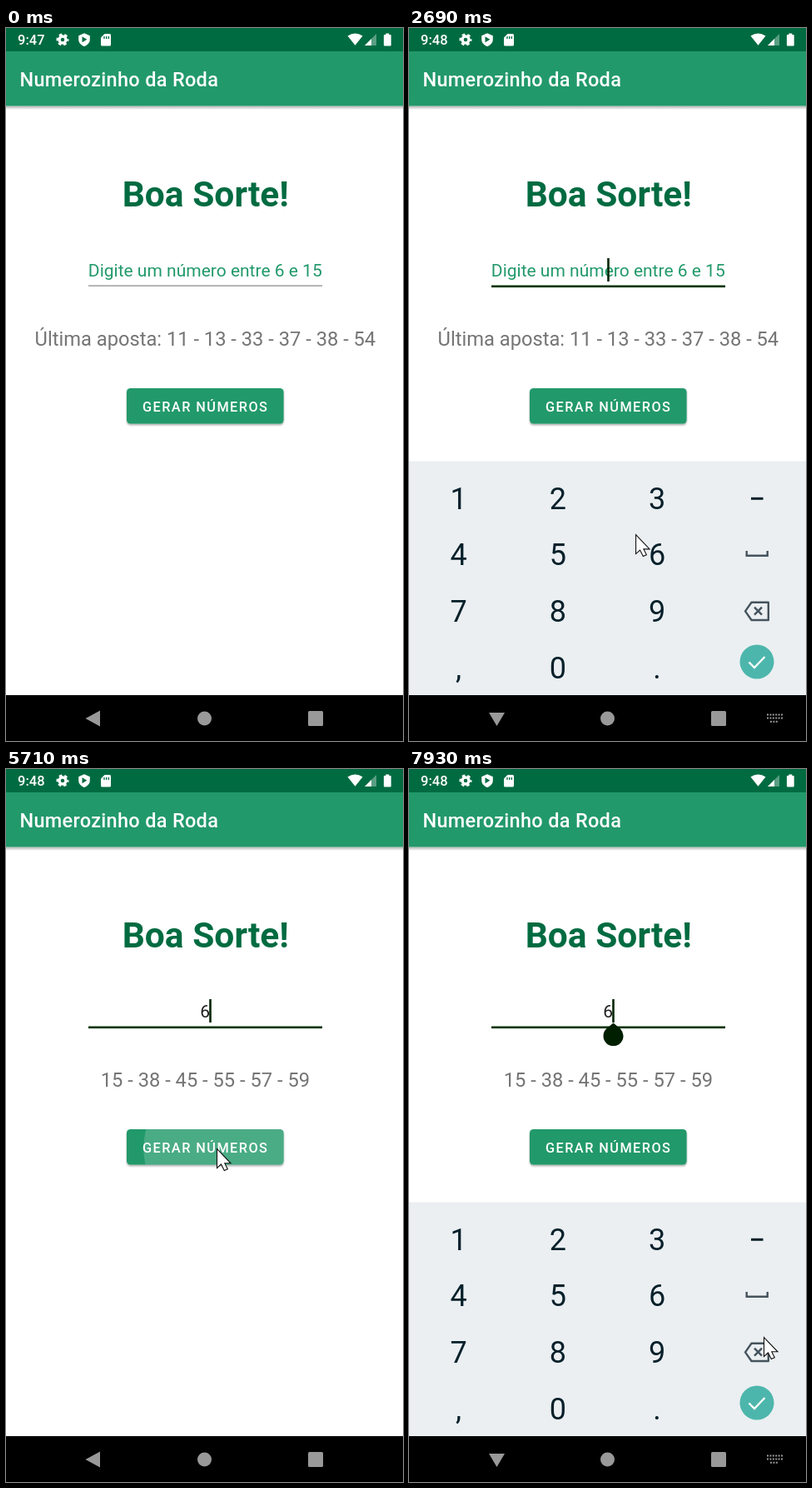
An HTML page that plays this animation: 477x855 px, repeating every 8000 ms.

```html
<!DOCTYPE html>
<html lang="pt-BR">
<head>
<meta charset="utf-8">
<title>Numerozinho da Roda</title>
<style>
  html, body { margin: 0; width: 100%; height: 100%; overflow: hidden; background: #fff; }
  svg { display: block; width: 100vw; height: 100vh; }
  text { font-family: Roboto, "Open Sans", sans-serif; }
  .mid { text-anchor: middle; }
  .medium { font-weight: 500; fill: #fff; }
  #keys text { font-size: 36px; fill: #06202a; text-anchor: middle; }
</style>
</head>
<body>
<svg viewBox="0 0 477 855">
  <defs>
    <linearGradient id="fall" x2="0" y2="1">
      <stop stop-color="#000" stop-opacity=".3"/>
      <stop offset="1" stop-color="#000" stop-opacity="0"/>
    </linearGradient>
    <filter id="lift" x="-10%" y="-20%" width="120%" height="150%">
      <feDropShadow dx="0" dy="1.6" stdDeviation="1.2" flood-opacity=".36"/>
    </filter>
    <clipPath id="btnClip"><rect x="145" y="432" width="188.6" height="42.5" rx="4.6"/></clipPath>
  </defs>
  <rect width="477" height="855" fill="#fff"/>

  <!-- app bar -->
  <rect y="93.5" width="477" height="4.5" fill="url(#fall)"/>
  <rect y="28" width="477" height="65.5" fill="#22996b"/>
  <text class="medium" x="16.5" y="70" font-size="23.5" letter-spacing=".3">Numerozinho da Roda</text>

  <!-- status bar -->
  <rect width="477" height="28" fill="#006b41"/>
  <text id="clock" class="medium" x="14" y="20" font-size="16.5"></text>
  <g fill="#fff">
    <circle cx="68" cy="14" r="4" fill="none" stroke="#fff" stroke-width="3.4"/>
    <circle cx="68" cy="14" r="6.3" fill="none" stroke="#fff" stroke-width="2.4" stroke-dasharray="3.5 3.1" stroke-dashoffset="1.75"/>
    <path d="M94 6.3l6.8 2.9v4.6c0 3.9-2.9 6.9-6.8 8.2c-3.9-1.3-6.8-4.3-6.8-8.2V9.2z"/>
    <path d="M91.5 10.3v7l5.8-3.5z" fill="#006b41"/>
    <path d="M118.5 7h6q1.5 0 1.5 1.5v11.5q0 1.5-1.5 1.5h-9q-1.5 0-1.5-1.5v-8.5z"/>
    <path d="M118 10v3M120.7 10v3M123.4 10v3" stroke="#006b41" stroke-width="1.3"/>
    <path d="M410.5 9.6q9-6 18 0L419.5 20.8z"/>
    <path d="M445 7v14h-14z" opacity=".35"/>
    <path d="M439 13v8h-8z"/>
    <path d="M456.3 6.5h4v1.5h1.4q1 0 1 1v11.5q0 1-1 1h-6.8q-1 0-1-1V9q0-1 1-1h1.4z"/>
  </g>

  <!-- form -->
  <text class="mid" x="239.8" y="214" font-size="42.5" font-weight="700" fill="#006b41">Boa Sorte!</text>
  <text id="hint" class="mid" x="239.3" y="298" font-size="21" fill="#22996b">Digite um número entre 6 e 15</text>
  <text id="value" class="mid" x="239.2" y="298" font-size="21" fill="#212121">6</text>
  <rect id="line" x="99" y="308.5" width="281"/>
  <rect id="caret" y="276" width="2.6" height="28" fill="#002600"/>
  <path id="handle" d="M245.5 304.5l7.8 6.5a12 12 0 1 1-15.6 0z" fill="#001f00"/>
  <text id="bet" class="mid" x="239.4" y="381" font-size="23.7" fill="#757575"></text>
  <rect x="145" y="432" width="188.6" height="42.5" rx="4.6" fill="#22996b" filter="url(#lift)"/>
  <circle id="ripple" cx="253" cy="455" fill="#fff" clip-path="url(#btnClip)"/>
  <text class="medium" x="164" y="460" font-size="16.3" letter-spacing="1.46">GERAR NÚMEROS</text>

  <!-- number pad -->
  <g id="pad">
    <rect y="519.5" width="477" height="281" fill="#ebeff2"/>
    <rect id="press" x="241" y="598" width="117" height="66" fill="#dce1e5"/>
    <g id="keys"></g>
    <g fill="none" stroke="#44535d" stroke-width="2.4">
      <path d="M411 564.3h14.5" stroke="#06202a" stroke-width="3"/>
      <path d="M405.7 627v5.8h25V627"/>
      <path d="M411.5 688.7h20.3v21.3h-20.3l-7.5-10.65z" stroke-linejoin="round"/>
      <path d="M415 694.7l9 9m0-9l-9 9"/>
    </g>
    <circle id="done" cx="418" cy="760" r="20.5"/>
    <path d="M408.5 760.5l6.5 6.5 12.5-13" fill="none" stroke="#fff" stroke-width="2.3"/>
  </g>

  <!-- navigation bar -->
  <rect y="800" width="477" height="55"/>
  <g fill="#999">
    <path id="back"/>
    <circle cx="238.5" cy="828" r="8.5"/>
    <rect x="363" y="819" width="18" height="18" rx="1.5"/>
    <path id="switcher" d="M430 823.5h19M430 827.5h19M434 831.8h10" fill="none" stroke="#999" stroke-width="1.9" stroke-dasharray="2 1.4"/>
  </g>

  <path id="pointer" d="M.5.5V23.5L5.5 19 9.3 26.5 13.3 24.7 9.8 17.8H17z" fill="#fff" stroke="#111" stroke-width="1.1"/>
</svg>
<script>
const LOOP = 8000, BLINK = 480;
const START = { x: 412, y: 800, time: 270 };
const MINUTE = 1090, FOCUS = 1700, TYPE = 3185, DONE = 4340, CLOSE = 4600;
const DRAWN = 5640, TAP = 7320, REOPEN = 7460;

// Pointer moves: start, end, x, y; it rests in between
const MOVES = [
  [270, 1020, 221, 305], [1090, 1150, 203, 268], [1480, 1550, 223, 284],
  [1890, 2690, 272, 607], [2690, 2970, 292, 629], [3590, 4070, 406, 773],
  [4070, 4140, 424, 759], [4550, 4770, 381, 693], [4770, 5100, 253, 455],
  [6250, 6650, 248, 352], [6650, 6860, 243, 292], [7300, 7930, 426, 681]
];

const el = Object.fromEntries([...document.querySelectorAll("svg [id]")].map(n => [n.id, n]));
const part = (t, a, b) => Math.min(1, Math.max(0, (t - a) / (b - a)));
const within = (t, a, b) => t >= a && t < b;
const show = (node, on) => node.setAttribute("visibility", on ? "visible" : "hidden");
const set = (node, attrs) => { for (const k in attrs) node.setAttribute(k, attrs[k]); };
const rise = (t, start) => 1 - (1 - part(t, start, start + 240)) ** 2;

["123", "456", "789", ",0."].forEach((row, r) => [...row].forEach((ch, c) => {
  const key = document.createElementNS("http://www.w3.org/2000/svg", "text");
  set(key, { x: 59.5 + c * 119.3, y: 576.5 + r * 67.8 });
  key.textContent = ch;
  el.keys.append(key);
}));

function pointerAt(t) {
  let { x, y } = START;
  for (const [a, b, toX, toY] of MOVES) {
    const k = part(t, a, b);
    x += (toX - x) * k;
    y += (toY - y) * k;
  }
  return [x, y];
}

// Blinking restarts whenever the field is touched
function caretOn(t) {
  const since = [FOCUS, TYPE, CLOSE + 90, REOPEN].filter(s => s <= t).pop();
  return since !== undefined && Math.floor((t - since) / BLINK) % 2 === 0;
}

function drawForm(t) {
  const focused = t >= FOCUS, typed = t >= TYPE;
  show(el.hint, !typed);
  show(el.value, typed);
  set(el.line, focused ? { height: 2.6, fill: "#003300" } : { height: 1.2, fill: "#858585" });
  el.caret.setAttribute("x", typed ? 244.2 : 238.2);
  show(el.caret, caretOn(t));
  show(el.handle, t >= TAP);
  el.bet.textContent = t < DRAWN ? "Última aposta: 11 - 13 - 33 - 37 - 38 - 54" : "15 - 38 - 45 - 55 - 57 - 59";
  set(el.ripple, {
    r: 110 * part(t, DRAWN - 200, DRAWN + 140),
    opacity: within(t, DRAWN - 130, DRAWN + 280) ? 0.24 * (1 - part(t, DRAWN, DRAWN + 280)) : 0
  });
}

function drawPad(t) {
  const open = rise(t, FOCUS + 240) * (1 - part(t, CLOSE, CLOSE + 150)) + rise(t, REOPEN);
  set(el.pad, { transform: `translate(0 ${(1 - open) * 281})`, opacity: Math.min(1, open * 1.5) });
  el.press.setAttribute("opacity", within(t, TYPE - 65, TYPE + 115) ? 1 : 0);
  el.done.setAttribute("fill", within(t, DONE, DONE + 130) ? "#80cbc4" : "#4db6ac");
  show(el.switcher, open > 0);
  el.back.setAttribute("d", open > 0 ? "M96 821h19l-9.5 16z" : "M95.5 828l17.5-9.5v19z");
}

function draw(t) {
  el.clock.textContent = t < MINUTE ? "9:47" : "9:48";
  drawForm(t);
  drawPad(t);
  el.pointer.setAttribute("transform", `translate(${pointerAt(t)})`);
  show(el.pointer, t >= START.time);
}

function tick() {
  draw(performance.now() % LOOP);
  requestAnimationFrame(tick);
}
tick();
</script>
</body>
</html>
```
